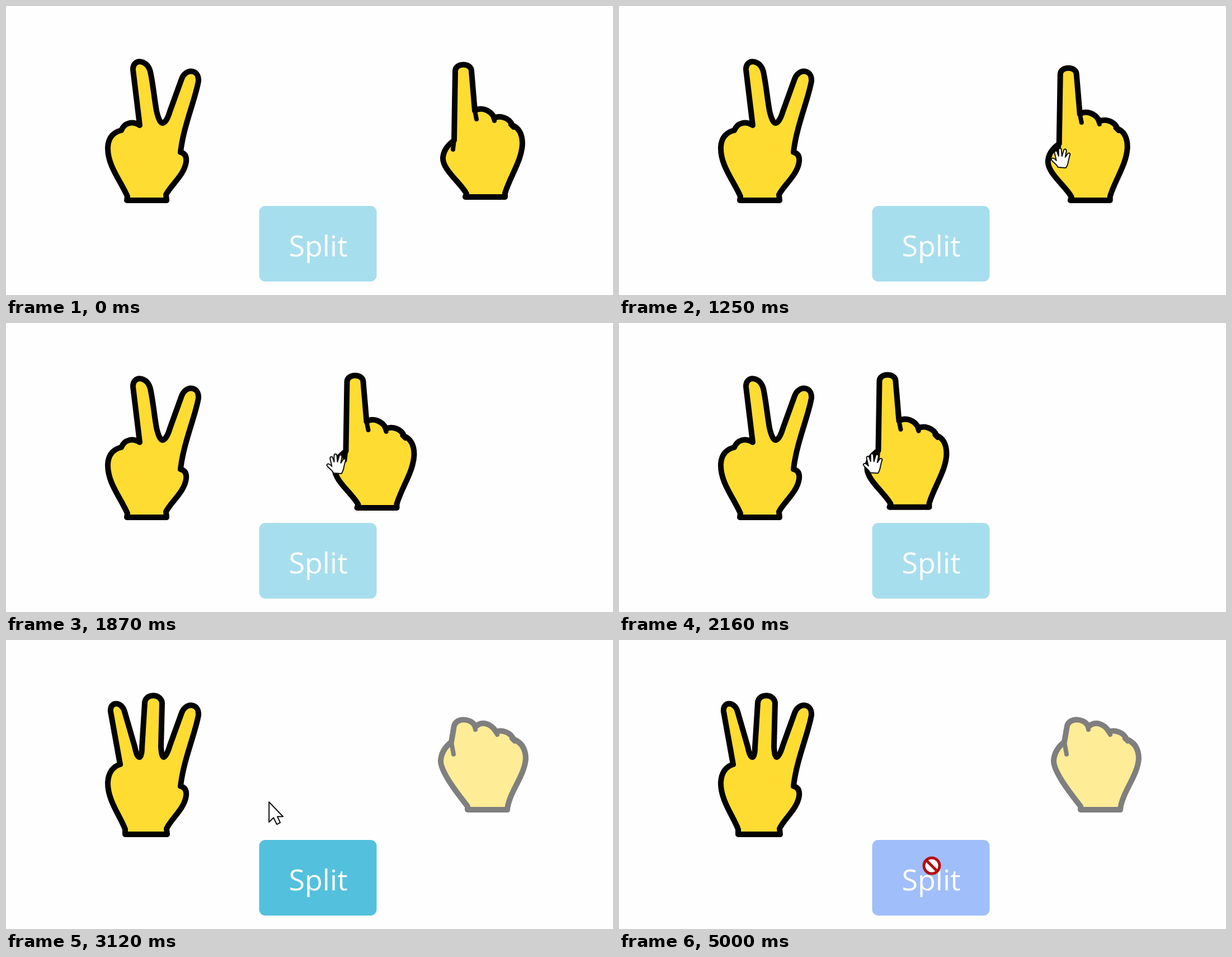
Write an HTML page that moves like this. It is 1085x516 px and loops after 5.1 s.

```html
<!DOCTYPE html>
<html lang="en">
<head>
<meta charset="utf-8">
<title>Split</title>
<style>
  html, body { margin: 0; width: 100%; height: 100%; overflow: hidden; background: #fefefe; }
  svg { display: block; width: 100%; height: 100%; }
  .hand { fill: #fedc32; stroke: #030303; stroke-width: 10; stroke-linejoin: round; stroke-linecap: round; }
  .cursor { fill: #fff; stroke: #111; stroke-width: 2; stroke-linejoin: round; }
  text { font: 52px "Open Sans", "Noto Sans", sans-serif; fill: #fff; text-anchor: middle; }
</style>
</head>
<body>
<svg viewBox="0 0 1085 516">
  <g class="hand">
    <path id="two" d="M216 347 L217 340 C205 312 181 285 182 252 C183 234 193 225 206 222
      C212 208 226 205 239 213 L227 114 C226 94 252 94 258 117 C263 140 265 165 269 187
      Q274 209 280 209 Q287 208 293 188 L314 130 C321 111 345 112 344 134
      C339 165 317 215 312 261 C320 263 323 269 322 278 C319 302 294 320 286 337 L287 347 Z"/>
    <path id="three" d="M213 347 L213 338 C204 314 181 285 182 254 C183 237 191 226 204 222
      L187 128 C185 109 207 109 212 128 L230 190 Q234 210 239 209 Q243 207 243 192
      L248 112 C249 95 277 95 279 112 L277 190 Q278 209 282 209 Q287 208 293 188
      L314 130 C321 111 345 112 344 134 C339 165 317 215 312 261
      C320 263 323 269 322 278 C319 302 294 320 287 337 L288 347 Z"/>
    <g id="one">
      <path d="M821 341 L823 335 C813 316 780 292 781 271 C782 257 791 247 801 240
        L803 116 C803 101 832 101 832 116 L838 187 C849 180 866 185 873 200
        C882 195 900 199 905 213 C916 217 923 228 923 246 C922 276 901 304 892 334 L892 341 Z"/>
      <path fill="none" d="M801 238 L799 256 M838 187 L841 202 M871 199 L873 205 M902 212 L907 217" stroke-width="8"/>
    </g>
    <g id="fist" opacity=".5">
      <path d="M825 303 L825 297 C812 280 776 236 777 215 C778 201 786 190 796 182
        L801 153 C805 138 833 139 839 155 C851 143 868 150 876 164
        C887 159 903 166 907 177 C922 183 929 195 929 212 C927 243 899 272 896 303 Z"/>
      <path fill="none" d="M796 182 L800 204 M838 155 L839 160 M875 163 L878 169 M904 176 L909 181" stroke-width="8"/>
    </g>
  </g>
  <g id="button">
    <rect id="face" x="452.5" y="357" width="210" height="135" rx="11"/>
    <text x="558" y="447">Split</text>
  </g>
  <g id="pointer" class="cursor">
    <path id="arrow" d="M0 0 V36 L8 28 L14 40 L20 37 L15 26 H25 Z"/>
    <path id="grab" d="M-5 17 C-8 10 -18 6 -17 2 C-15 -1 -11 1 -8 5 L-11 -8 C-12 -13 -7 -14 -6 -9
      L-4 -3 V-14 C-4 -18 1 -18 1 -14 L2 -3 L5 -13 C6 -17 10 -16 10 -12 L8 -1
      L12 -7 C14 -10 18 -8 16 -4 C13 4 14 12 9 18 Z"/>
    <g id="press">
      <path d="M-3 3 C-3 -2 5 -2 5 3 V13 C8 10 12 11 12 14 C15 12 18 13 18 16 C21 14 24 16 24 20
        V32 C24 42 17 49 7 49 C-3 49 -7 40 -13 31 C-15 27 -10 25 -7 28 L-3 33 Z"/>
      <path d="M5 13 V24 M12 14 V25 M18 16 V26"/>
    </g>
    <g id="denied" transform="translate(-2 -1)">
      <circle r="14"/>
      <path d="M-9 -9 L9 9" stroke="#b40d12" stroke-width="5"/>
      <circle r="14" fill="none" stroke="#b40d12" stroke-width="5"/>
    </g>
  </g>
</svg>
<script>
const DURATION = 5100;
const GRAB = 600, DROP = 2340, ENABLE = 2950, HOVER = 3460, CLICK = 4350;

// Keyframes: [ms, x, y]
const dragPath = [[950, 0, 0], [1250, -14, 6], [1580, -92, 0], [1870, -193, -11], [2040, -275, -15], [DROP, -430, -8]];
const returnPath = [[DROP, -430, 0], [2500, -405, 0], [2700, -210, 0], [2840, -60, 0], [ENABLE, 0, 0]];
const cursorPath = [
  [100, 700, 530], [720, 804, 265], [950, 804, 265], [1250, 790, 271], [1580, 704, 262],
  [1870, 591, 251], [2040, 505, 247], [DROP, 378, 255], [2500, 450, 269], [3120, 470, 289], [3640, 561, 404]
];

const el = Object.fromEntries([...document.querySelectorAll("[id]")].map(node => [node.id, node]));
const show = (node, visible) => node.style.display = visible ? "" : "none";

function place(node, keys, t) {
  const next = keys.findIndex(key => key[0] > t);
  let [, x, y] = keys[next < 0 ? keys.length - 1 : next];
  if (next > 0) {
    const [t0, x0, y0] = keys[next - 1];
    const k = (t - t0) / (keys[next][0] - t0);
    x = x0 + (x - x0) * k;
    y = y0 + (y - y0) * k;
  }
  node.setAttribute("transform", `translate(${x} ${y})`);
}

function draw() {
  const t = performance.now() % DURATION;
  const dropped = t >= DROP;
  show(el.two, !dropped);
  show(el.one, !dropped);
  show(el.three, dropped);
  show(el.fist, dropped);
  place(el.one, dragPath, t);
  place(el.fist, returnPath, t);

  el.face.setAttribute("fill", t < HOVER ? "#53c0dd" : "#4480f5");
  el.button.setAttribute("opacity", t >= ENABLE && t < CLICK ? 1 : 0.5);

  const cursor = t < GRAB ? "arrow" : t < DROP ? "grab" : t < HOVER ? "arrow" : t < CLICK ? "press" : "denied";
  for (const name of ["arrow", "grab", "press", "denied"]) show(el[name], name === cursor);
  show(el.pointer, t > 100);
  place(el.pointer, cursorPath, t);
  requestAnimationFrame(draw);
}
draw();
</script>
</body>
</html>
```
